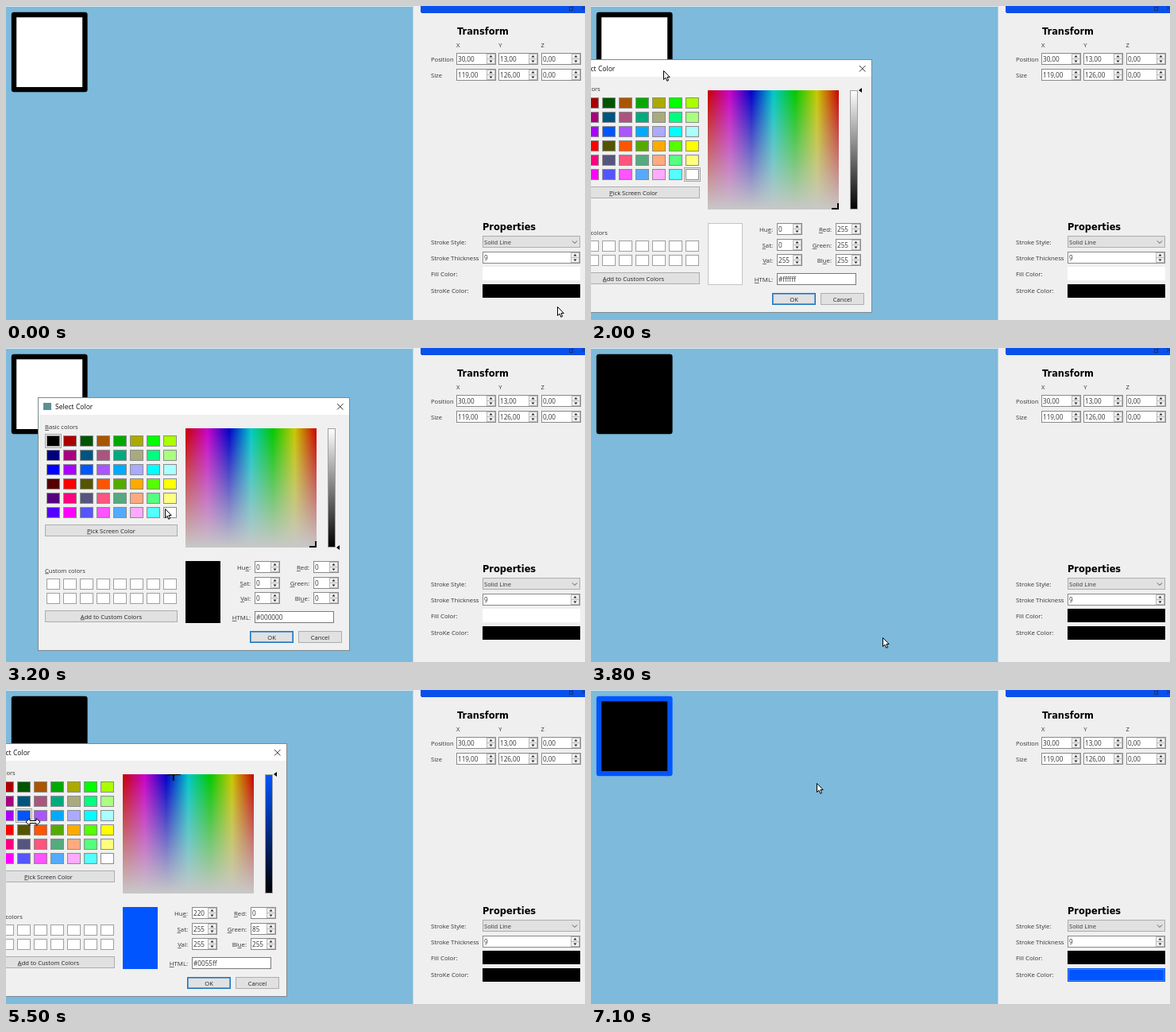
These frames come from a looping animation (729 by 395 pixels, 7.2 s). An HTML page with a canvas:

```html
<!DOCTYPE html>
<html lang="en">
<head>
<meta charset="utf-8">
<title>Color picker</title>
<style>
  html, body { margin: 0; width: 100%; height: 100%; overflow: hidden; background: #efefef; }
  canvas { display: block; width: 729px; height: 395px; }
</style>
</head>
<body>
<canvas id="stage" width="729" height="395"></canvas>
<script>
const ctx = document.getElementById('stage').getContext('2d');
const LOOP = 7200, STEP = 100;
const SANS = '"Open Sans", "Noto Sans", sans-serif';
const INK = '#333';

const WHITE = { rgb: [255, 255, 255], hsv: [0, 0, 255], cell: [7, 5] };
const BLACK = { rgb: [0, 0, 0], hsv: [0, 0, 0], cell: [0, 0] };
const BLUE = { rgb: [0, 85, 255], hsv: [220, 255, 255], cell: [2, 2] };
const css = c => `rgb(${c.rgb})`;
const hex = c => '#' + c.rgb.map(v => v.toString(16).padStart(2, '0')).join('');

// time, x, y of the pointer
const path = [
  [0, 694, 378], [400, 662, 340], [700, 655, 337], [900, 420, 285],
  [1100, 108, 178], [1600, 94, 92], [1800, 91, 81], [2000, 91, 81],
  [2400, 170, 76], [2500, 165, 80], [2800, 60, 118], [3000, 60, 118],
  [3200, 200, 202], [3500, 334, 363], [3700, 335, 364], [4200, 643, 364],
  [4600, 643, 364], [4900, 480, 280], [5200, 22, 158], [5400, 23, 158],
  [5500, 34, 166], [6000, 255, 367], [6300, 256, 367], [6400, 258, 365],
  [6800, 284, 118], [7000, 285, 118], [7100, 284, 117], [7200, 284, 117]
];

function pointerAt(t) {
  let i = 0;
  while (i < path.length - 2 && path[i + 1][0] <= t) i++;
  const [t0, x0, y0] = path[i], [t1, x1, y1] = path[i + 1];
  const p = (t - t0) / (t1 - t0), e = p * p * (3 - 2 * p);
  return [x0 + (x1 - x0) * e, y0 + (y1 - y0) * e];
}

const within = (t, a, b) => t >= a && t < b;

function fillBox(x, y, w, h, color) {
  ctx.fillStyle = color;
  ctx.fillRect(x, y, w, h);
}

function box(x, y, w, h, fill, edge) {
  fillBox(x, y, w, h, edge);
  fillBox(x + 1, y + 1, w - 2, h - 2, fill);
}

function line(points, color, width = 1) {
  ctx.strokeStyle = color;
  ctx.lineWidth = width;
  ctx.beginPath();
  points.forEach(([x, y]) => ctx.lineTo(x, y));
  ctx.stroke();
}

function shape(points, fill, edge) {
  ctx.beginPath();
  points.forEach(([x, y]) => ctx.lineTo(x, y));
  ctx.closePath();
  ctx.fillStyle = fill;
  ctx.fill();
  if (edge) {
    ctx.strokeStyle = edge;
    ctx.lineWidth = 1;
    ctx.stroke();
  }
}

// "&" underlines the letter after it
function text(str, x, y, size = 7.6, align = 'left', color = INK) {
  const at = str.indexOf('&'), s = str.replace('&', '');
  ctx.font = `${size}px ${SANS}`;
  ctx.fillStyle = color;
  const w = ctx.measureText(s).width;
  const left = x - (align === 'right' ? w : align === 'center' ? w / 2 : 0);
  ctx.fillText(s, left, y);
  if (at >= 0) {
    const before = ctx.measureText(s.slice(0, at)).width;
    fillBox(left + before, y + 1, ctx.measureText(s[at]).width, 0.7, color);
  }
}

function heading(str, x, y) {
  ctx.font = 'bold 11.4px "DejaVu Sans", sans-serif';
  ctx.fillStyle = '#000';
  ctx.fillText(str, x, y);
}

function dotted(x, y, w, h, color) {
  ctx.setLineDash([1, 1]);
  ctx.strokeStyle = color;
  ctx.lineWidth = 1;
  ctx.strokeRect(x + 0.5, y + 0.5, w - 1, h - 1);
  ctx.setLineDash([]);
}

function spin(x, y, w, value) {
  box(x, y, w, 15, '#fff', '#8a8a8a');
  const bx = x + w - 12, cx = bx + 5.5;
  box(bx, y + 1, 11, 7, '#f0f0f0', '#bbb');
  box(bx, y + 7, 11, 7, '#f0f0f0', '#bbb');
  shape([[cx - 2, y + 5.5], [cx + 2, y + 5.5], [cx, y + 3]], '#222');
  shape([[cx - 2, y + 9.5], [cx + 2, y + 9.5], [cx, y + 12]], '#222');
  text(String(value), x + 2, y + 11, 8.2);
}

function button(x, y, w, label, focus) {
  box(x, y, w, 15, '#e1e1e1', focus ? '#1a74c0' : '#adadad');
  if (focus) {
    ctx.strokeStyle = 'rgba(26,116,192,0.6)';
    ctx.lineWidth = 1;
    ctx.strokeRect(x + 1.5, y + 1.5, w - 3, 12);
  }
  text(label, x + w / 2, y + 10.5, 7.6, 'center', '#222');
}

function drawView(fill, stroke) {
  fillBox(0, 0, 513, 395, '#7dbadb');
  fillBox(0, 0, 512, 1, '#dce8ee');
  ctx.fillStyle = fill;
  ctx.strokeStyle = stroke;
  ctx.lineWidth = 6.4;
  ctx.lineJoin = 'round';
  ctx.beginPath();
  ctx.rect(10, 11, 89.4, 94.1);
  ctx.fill();
  ctx.stroke();
  ctx.lineJoin = 'miter';
}

function drawPanel(fill, stroke, focus) {
  fillBox(512.5, 0, 216.5, 395, '#efefef');
  fillBox(522, 0, 207, 9, '#0a50ea');
  fillBox(522, 8, 1, 1, '#efefef');
  ctx.strokeStyle = '#1c2f66';
  ctx.lineWidth = 1;
  ctx.strokeRect(709.5, 1.5, 4, 4);
  line([[712, 3], [716, -1]], '#1c2f66');
  line([[725, 5], [729, 1]], '#1c2f66');
  line([[725, 0], [729, 4]], '#1c2f66');

  heading('Transform', 568, 36);
  ['X', 'Y', 'Z'].forEach((s, i) => text(s, 567 + i * 53.3, 52));
  [['Position', 59, ['30,00', '13,00', '0,00']],
   ['Size', 79, ['119,00', '126,00', '0,00']]].forEach(([label, y, vals]) => {
    text(label, 535, y + 10.5);
    vals.forEach((v, i) => spin(567 + Math.round(i * 53.4), y, 50, v));
  });

  heading('Properties', 600, 281.5);
  text('Stroke Style:', 535, 300, 7.8);
  text('Stroke Thickness', 535, 320, 7.8);
  text('Fill Color:', 535, 340, 7.8);
  text('StroKe Color:', 535, 361.3, 7.8);
  box(600, 289, 123, 15, '#e1e1e1', '#adadad');
  text('Solid Line', 602, 300);
  line([[713, 295.5], [716, 298.5], [719, 295.5]], '#555');
  spin(600, 309, 123, 9);
  fillBox(600, 328, 123, 17, fill);
  fillBox(600, 350, 123, 17, stroke);
  if (focus) dotted(601, 351, 121, 15, '#8fb4ff');
}

function drawPalette(pick) {
  for (let i = 0; i < 48; i++) {
    const x = 51 + Math.floor(i / 6) * 21, y = 110 + (i % 6) * 18;
    const r = Math.floor(i / 3) % 4 * 85, g = Math.floor(i / 12) * 85;
    const b = Math.floor(i % 3 * 127.5);
    box(x, y, 17, 14, `rgb(${r},${g},${b})`, '#8c8c8c');
  }
  const [c, r] = pick.cell;
  dotted(49 + c * 21, 108 + r * 18, 21, 18, '#555');
  for (let i = 0; i < 16; i++) {
    box(51 + i % 8 * 21, 290 + Math.floor(i / 8) * 18, 17, 14, '#fff', '#a0a0a0');
  }
}

function drawSpectrum(pick) {
  const X = 226, Y = 101, W = 165, H = 150;
  const hue = ctx.createLinearGradient(X, 0, X + W, 0);
  ['#c80000', '#c800c8', '#0000c8', '#00c8c8', '#00c800', '#c8c800', '#c80000']
    .forEach((c, i) => hue.addColorStop(i / 6, c));
  fillBox(X, Y, W, H, hue);
  const fade = ctx.createLinearGradient(0, Y, 0, Y + H);
  fade.addColorStop(0, 'rgba(200,200,200,0)');
  fade.addColorStop(1, 'rgba(200,200,200,1)');
  fillBox(X, Y, W, H, fade);

  const [h, s, v] = pick.hsv;
  const cx = X + (360 - h) / 360 * (W - 1), cy = Y + (255 - s) / 255 * (H - 1);
  ctx.save();
  ctx.beginPath();
  ctx.rect(X, Y, W, H);
  ctx.clip();
  fillBox(cx - 8, cy - 1, 17, 2, '#000');
  fillBox(cx - 1, cy - 7, 2, 15, '#000');
  ctx.restore();

  const lum = ctx.createLinearGradient(0, Y, 0, Y + H);
  lum.addColorStop(0, css(pick.hsv[2] ? pick : WHITE));
  lum.addColorStop(1, '#000');
  box(405, Y, 10, H, lum, '#a0a0a0');
  const ly = Y + (255 - v) / 255 * H;
  shape([[416, ly], [420, ly - 3], [420, ly + 3]], '#000');
}

// Laid out at its dragged position; dx, dy shift it back
function drawDialog(pick, dx, dy) {
  ctx.save();
  ctx.translate(dx, dy);
  box(40, 62, 393, 319, '#f0f0f0', '#7f8a90');
  fillBox(41, 63, 391, 21, '#fff');
  fillBox(47, 69, 10, 9, '#5d8f95');
  text('Select Color', 62, 77, 8.6, 'left', '#111');
  line([[417, 70], [424.5, 77.5]], '#333');
  line([[424.5, 70], [417, 77.5]], '#333');

  text('&Basic colors', 49, 102);
  drawPalette(pick);
  button(49, 222, 167, '&Pick Screen Color');
  text('&Custom colors', 49, 282.5);
  button(49, 330, 167, '&Add to Custom Colors');
  drawSpectrum(pick);
  box(226, 268, 44, 78, css(pick), pick === WHITE ? '#c4c4c4' : css(pick));

  ['Hu&e:', '&Sat:', '&Val:'].forEach((s, i) => {
    const y = 268 + Math.round(i * 19.5);
    text(s, 308, y + 11, 7.8, 'right');
    spin(313, y, 32, pick.hsv[i]);
  });
  ['&Red:', '&Green:', 'Bl&ue:'].forEach((s, i) => {
    const y = 268 + Math.round(i * 19.5);
    text(s, 382, y + 11, 7.8, 'right');
    spin(387, y, 32, pick.rgb[i]);
  });
  text('&HTML:', 308, 342, 7.8, 'right');
  box(313, 331, 100, 15, '#fff', '#7a7a7a');
  text(hex(pick), 315, 342, 8.2);
  button(307, 356, 55, 'OK', true);
  button(368, 356, 55, 'Cancel');
  ctx.restore();
}

function drawPointer(x, y, resize) {
  ctx.save();
  ctx.translate(x, y);
  if (resize) {
    shape([[-9, 0], [-4, -4.5], [-4, -1.5], [4, -1.5], [4, -4.5], [9, 0],
           [4, 4.5], [4, 1.5], [-4, 1.5], [-4, 4.5]], '#fff', '#000');
  } else {
    shape([[0.5, 0.5], [0.5, 11.5], [3, 9.2], [4.8, 13.3], [6.6, 12.5],
           [4.9, 8.5], [8.2, 8.5]], '#fff', '#000');
  }
  ctx.restore();
}

function draw(t) {
  const fill = t >= 3700 ? '#000' : '#fff';
  const done = t >= 6300;
  const stroke = done ? css(BLUE) : '#000';
  const [x, y] = pointerAt(t);

  drawView(fill, stroke);
  drawPanel(fill, stroke, done);
  if (within(t, 700, 3700)) {
    // the dialog follows the pointer while its title bar is dragged
    const [px, py] = pointerAt(Math.min(Math.max(t, 2000), 2400));
    drawDialog(t >= 2900 ? BLACK : WHITE, Math.round(px - 170), Math.round(py - 76));
  } else if (within(t, 4400, 6300)) {
    drawDialog(t >= 5300 ? BLUE : WHITE, -79, 5);
  }
  drawPointer(x, y, within(t, 900, 1600) || within(t, 4900, 6300));
}

const start = performance.now();
function tick() {
  const t = (performance.now() - start) % LOOP;
  draw(Math.floor(t / STEP) * STEP);
  requestAnimationFrame(tick);
}
tick();
</script>
</body>
</html>
```
